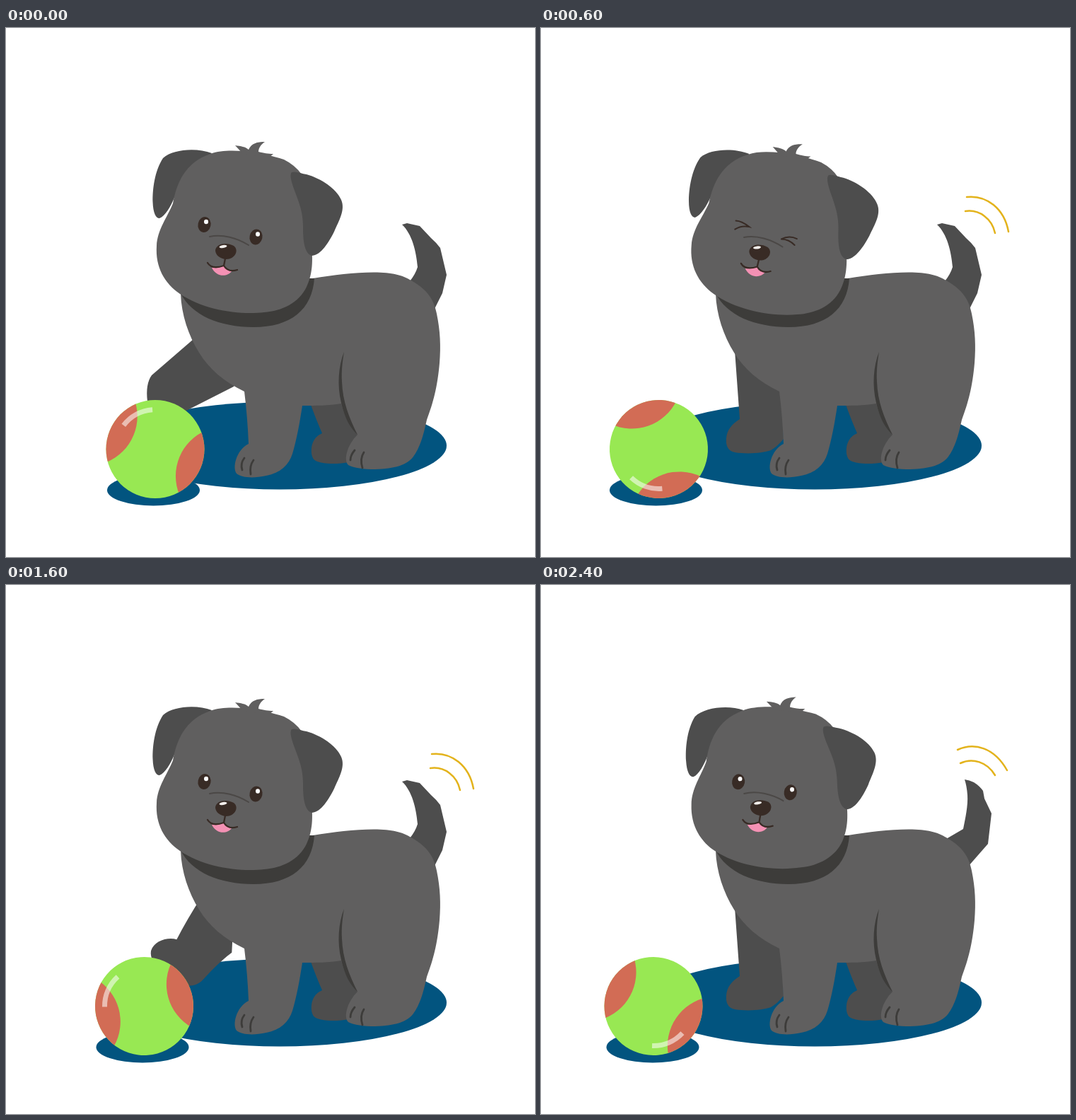
Animation, 748 px wide and 748 px high, one loop 2800 ms. Source, as an HTML page with a canvas:

```html
<!DOCTYPE html>
<html lang="en">
<head>
<meta charset="utf-8">
<title>Puppy with a ball</title>
<style>
  html, body { margin: 0; width: 100%; height: 100%; overflow: hidden; background: #fff; }
  canvas { display: block; width: 100vw; height: 100vh; }
</style>
</head>
<body>
<canvas id="stage" width="748" height="748"></canvas>
<script>
const ctx = document.getElementById('stage').getContext('2d');
const RAD = Math.PI / 180;

const FUR = '#605f5f', DARK = '#4d4d4d', FOLD = '#3d3c3a', INK = '#382b25';
const BLUE = '#02547f', GREEN = '#98e853', RED = '#d26c55', GOLD = '#e3b31c';

const P = d => new Path2D(d);

const body = P(`M420,356 L434,354 C465,349 495,345 525,345.5 C550,346 563,351 573,357
  C596,370 605,384 609,404 C614,428 615,450 613,474 C610,508 604,530 595,554
  C590,577 585,594 576,606 C567,618 550,623 522,624 C506,624 492,622 484,618
  C477,611 482,590 497,575 C487,563 478,549 474,531 C456,534 438,534 419,534
  C415,560 411,582 405,602 C400,618 388,629 368,633 C350,637 333,636 326,630
  C320,622 325,597 343,588 C342,563 340,538 337,514 C308,500 287,482 273,459
  C258,435 248,405 247,376 L300,340 Z`);
const crease = P(`M478,458 C470,478 468,505 474,530 C479,553 488,567 497,575
  C485,551 476,528 475,500 C474,485 476,470 478,458 Z`);
const hindFar = P(`M431,533 L476,528 L499,576 L486,614 C468,617 448,617 438,612
  C430,608 431,592 434,586 C437,579 441,576 447,573 C441,560 436,546 431,533 Z`);
const collar = P(`M247,375 C262,406 302,423 350,423 C403,423 433,398 436,354 L420,354 L300,340 Z`);
const toes = P(`M337,608 Q331,616 334,625 M350,611 Q344,619 346,631
  M493,597 Q487,604 487,611 M506,600 Q500,609 504,622`);

const tails = {
  up: P(`M560,278 L567,276 L585,280 L601,297 Q608,303 614,311 L623,349 L617,375 L605,399
    L571,358 Q579,348 582,338 C580,315 574,291 560,278 Z`),
  right: P(`M599,275 Q606,276 612,279 Q620,284 625,291 L627,302 L637,323 L632,366 L604,398
    L573,359 L597,345 C600,330 604,312 603,297 Q602,284 599,275 Z`)
};
const swish = {
  up: P('M602,239 C630,236 655,255 661,288 M600,259 C620,256 638,270 642,290'),
  right: P('M589,233 C613,222 641,230 659,262 M593,252 C610,244 631,250 642,269')
};

const legs = {
  reach: P(`M265,440 L206,491 C200,499 198,512 200,528 C215,545 235,550 257,540
    L322,507 L340,480 Z`),
  push: P(`M269,449 Q259,485 253,517 C240,517 223,528 223,543
    C224,552 233,560 238,565 C243,573 252,577 265,577 C286,578 298,573 304,563
    C311,549 319,531 333,512 L320,460 Z`),
  stand: P(`M274,456 L281,553 C270,560 263,568 262,580 C261,590 264,598 274,600
    C292,603 314,601 325,597 Q334,592 343,581 L340,510 Z`)
};

const skull = P(`M289,178 C302,173 318,173 335,174 C355,175 377,181 393,186 Q409,194 418,207
  L431,300 C435,330 433,349 425,366 C414,389 390,400 365,402 C330,406 280,399 246,376
  C224,361 211,338 213,308 C214,285 228,268 236,248 C241,220 253,190 289,178 Z`);
const tuft = P(`M324,166 C332,167 339,168 343,172 C347,163 355,161 366,161
  C360,165 357,170 357,175 C365,177 370,178 378,178 L372,183 L335,178 Z`);
const earLeft = P(`M291,177 C270,169 236,171 222,184 C210,202 207,229 207.5,246
  C208,262 212,269 217,269 C225,266 233,252 238,240 L252,228 Z`);
const earRight = P(`M404,204 C410,202 418,206 425,207 C446,213 467,227 474,243
  C480,257 471,272 464,288 C454,308 443,322 432,322 C421,318 420,298 420,280
  C420,253 409,236 404,218 C402,210 402,206 404,204 Z`);
const brow = P('M288,295 C306,291 327,297 343,307');
const nose = P('M296,314 C298,304 312,303 322,308 C330,314 324,327 311,327 C302,326 296,321 296,314 Z');
const tongue = P('M291,339 Q300,339 308,336 Q313,342 319,344 C313,352 298,353 291,339 Z');
const mouth = P('M310,326 L308,336 M285,332 Q291,342 308,336 Q314,346 327,342');
const squint = P(`M276,272 Q284,272 295,280 Q284,278 275,284
  M341,296 Q352,290 363,295 M341,296 Q352,296 360,304`);

function fill(path, color) {
  ctx.fillStyle = color;
  ctx.fill(path);
}

function stroke(path, color, width) {
  ctx.strokeStyle = color;
  ctx.lineWidth = width;
  ctx.stroke(path);
}

function oval(x, y, rx, ry, color, tilt = 0) {
  ctx.fillStyle = color;
  ctx.beginPath();
  ctx.ellipse(x, y, rx, ry, tilt * RAD, 0, 7);
  ctx.fill();
}

function turned(x, y, deg, draw) {
  ctx.save();
  ctx.translate(x, y);
  ctx.rotate(deg * RAD);
  draw();
  ctx.restore();
}

function drawBall(x, spin) {
  turned(x, 595.5, spin, () => {
    ctx.save();
    ctx.beginPath();
    ctx.arc(0, 0, 69.5, 0, 7);
    ctx.clip();
    ctx.fillStyle = GREEN;
    ctx.fillRect(-70, -70, 140, 140);
    for (const a of [-154, 21]) {
      oval(106 * Math.cos(a * RAD), 106 * Math.sin(a * RAD), 70, 70, RED);
    }
    ctx.restore();
    ctx.strokeStyle = 'rgba(255,255,255,.55)';
    ctx.lineWidth = 7;
    ctx.beginPath();
    ctx.arc(0, 0, 56, -143 * RAD, -94 * RAD);
    ctx.stroke();
  });
}

function drawEye(x, y) {
  oval(x, y, 9, 11, INK, 12);
  oval(x + 2.5, y - 4, 3, 3.2, '#fff');
}

function drawHead({ tilt, shift, lift, happy }) {
  turned(311 + shift, 320 + lift, tilt, () => {
    ctx.translate(-311, -320);
    fill(earLeft, DARK);
    fill(skull, FUR);
    fill(tuft, FUR);
    fill(earRight, DARK);
    ctx.translate(2 * shift, 0);
    stroke(brow, '#4b4846', 2);
    if (happy) {
      stroke(squint, INK, 2);
    } else {
      drawEye(280.5, 278);
      drawEye(353.5, 295.5);
    }
    fill(tongue, '#f491b4');
    stroke(mouth, INK, 2.3);
    fill(nose, INK);
    oval(307, 309, 5.5, 2, '#f3efec', -8);
  });
}

const level = { tilt: 0, shift: 0, lift: 0, happy: false };
const laugh = { tilt: 1.6, shift: -0.6, lift: 1.6, happy: true };
const proud = { tilt: -1.9, shift: 0, lift: -0.8, happy: false };

// Poses of one push; the whole push repeats every 1400 ms.
const poses = [
  { until: 200, ball: 211, shade: 208.5, spin: 0, leg: 'reach', tail: 'up', head: level, still: true },
  { until: 400, ball: 195.5, shade: 193, spin: -38, leg: 'push', swing: 17, tail: 'up', head: level },
  { until: 600, ball: 173, shade: 171.5, spin: -80, leg: 'push', tail: 'right', head: laugh },
  { until: 800, ball: 166.5, shade: 162.5, spin: -132, leg: 'stand', tail: 'up', head: laugh },
  { until: 1000, ball: 166.5, shade: 162.5, spin: -132, leg: 'stand', tail: 'right', head: laugh },
  { until: 1400, ball: 159, shade: 158, spin: -174, leg: 'stand', tail: 'right', head: proud }
];

function draw(pose) {
  ctx.fillStyle = '#fff';
  ctx.fillRect(0, 0, 748, 748);
  ctx.lineCap = 'butt';
  oval(387, 590.5, 236, 62, BLUE);
  oval(pose.shade, 653.5, 65.5, 22, BLUE);
  fill(tails[pose.tail], DARK);
  fill(hindFar, DARK);
  turned(300, 470, pose.swing || 0, () => {
    ctx.translate(-300, -470);
    fill(legs[pose.leg], DARK);
  });
  drawBall(pose.ball, pose.spin);
  fill(body, FUR);
  fill(crease, FOLD);
  fill(collar, FOLD);
  ctx.lineCap = 'round';
  stroke(toes, FOLD, 2.8);
  drawHead(pose.head);
  if (!pose.still) stroke(swish[pose.tail], GOLD, 2.5);
}

const start = performance.now();
function tick() {
  const t = (performance.now() - start) % 1400;
  draw(poses.find(p => t < p.until));
  requestAnimationFrame(tick);
}
tick();
</script>
</body>
</html>
```
